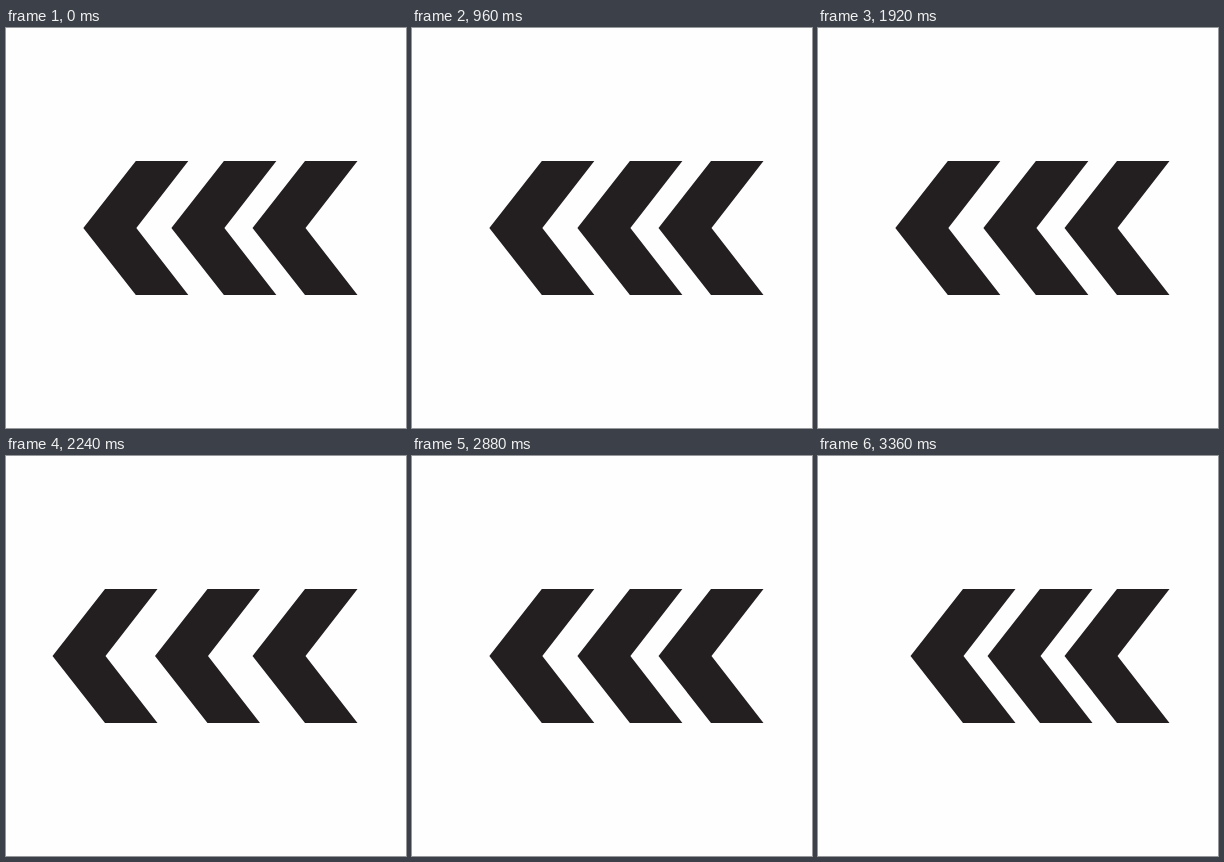
An HTML page that plays this animation: 400x400 px, repeating every 3.84 s.

```html
<!DOCTYPE html>
<html lang="en">
<head>
<meta charset="utf-8">
<title>Chevrons</title>
<style>
  html, body { margin: 0; width: 100%; height: 100%; overflow: hidden; background: #fefefe; }
  svg { display: block; width: 100%; height: 100%; }
</style>
</head>
<body>
<svg viewBox="0 0 400 400" fill="#231f20">
  <defs><path id="chevron" d="M0 200 52.5 133H105L53 200 105 267H52.5Z"/></defs>
  <use id="left" href="#chevron" x="92.5"/>
  <use id="middle" href="#chevron" x="169.5"/>
  <use href="#chevron" x="246.5"/>
</svg>
<script>
  const STEP = 40, CYCLE = 24, PEAK = 9, END = 13;
  const parts = [
    { el: document.getElementById('left'), rest: 92.5, reach: 46, power: 3.4 },
    { el: document.getElementById('middle'), rest: 169.5, reach: 20.5, power: 1.9 }
  ];

  // Quick ease-out away from rest, then a short smooth return.
  function spread(step, power) {
    if (step >= END) return 0;
    if (step <= PEAK) return 1 - (1 - step / PEAK) ** power;
    return (1 + Math.cos(Math.PI * (step - PEAK) / (END - PEAK))) / 2;
  }

  function draw(time) {
    const step = Math.floor(time / STEP) % CYCLE + 1;
    for (const { el, rest, reach, power } of parts) {
      el.setAttribute('x', rest - reach * spread(step, power));
    }
  }

  function tick() {
    draw(performance.now());
    requestAnimationFrame(tick);
  }
  draw(0);
  requestAnimationFrame(tick);
</script>
</body>
</html>
```
